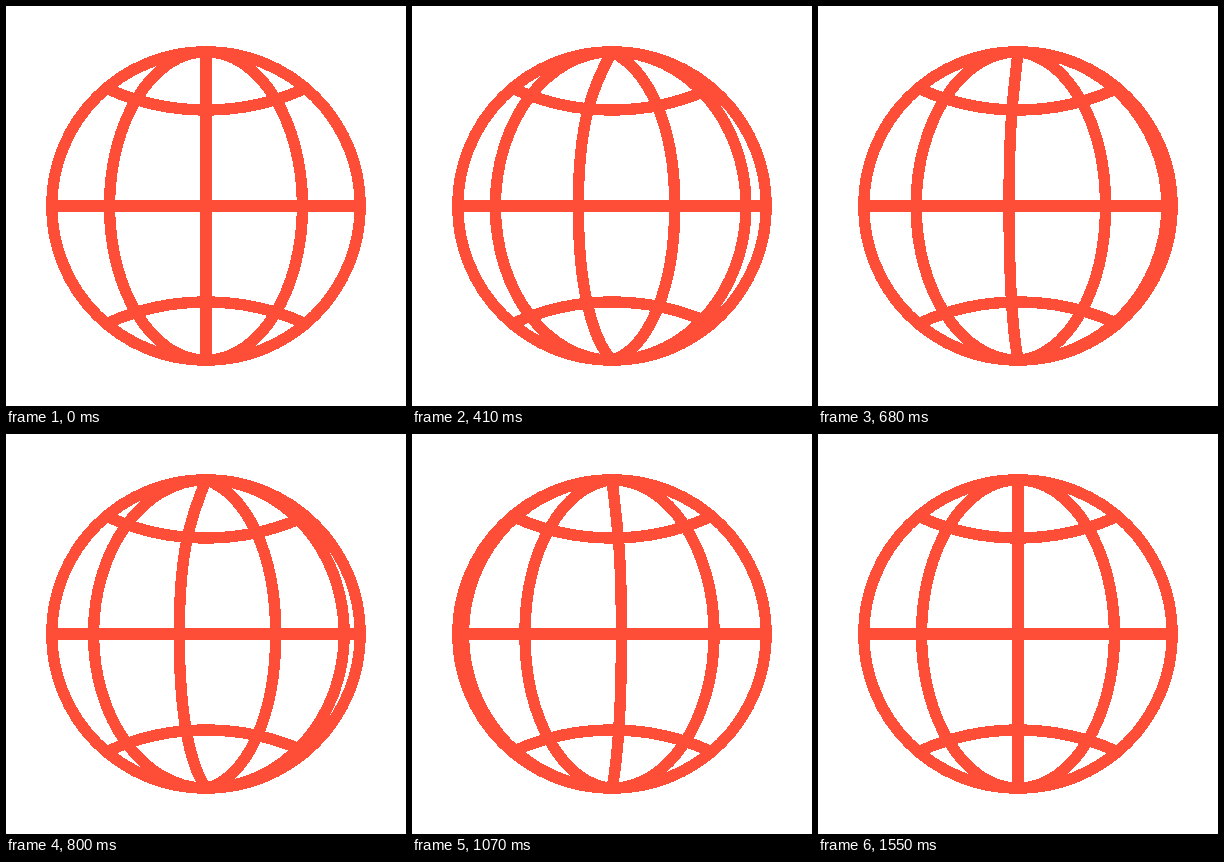
Write an HTML page that moves like this. It is 400 px wide and 400 px high and loops after 1.64 s.

```html
<!DOCTYPE html>
<html lang="en">
<head>
<meta charset="utf-8">
<title>Spinning globe</title>
<style>
  html, body { margin: 0; width: 100%; height: 100%; overflow: hidden; background: #fff; }
  svg { display: block; width: 100%; height: 100%; }
  .globe { fill: none; stroke: #ff4e37; stroke-width: 11.4; shape-rendering: crispEdges; }
</style>
</head>
<body>
<svg viewBox="0 0 400 400">
  <g class="globe">
    <circle cx="200" cy="200" r="154.25"/>
    <path d="M46 200H354"/>
    <path d="M102 83A239 239 0 0 0 298 83"/>
    <path d="M102 317A239 239 0 0 1 298 317"/>
    <path id="meridians"/>
  </g>
</svg>
<script>
  const LOOP = 1640, START = 200, SPIN = 1336, STEP = 30, TURNS = 7;
  const C = 200, R = 154.25, MID = 96.5;
  const KAPPA = 0.5523;                 // handle length of a quarter ellipse
  const DIP_TOP = 51, DIP_BOTTOM = 30;  // pole handles of the straight meridian
  const stops = [-R, -MID, 0, MID, R];
  const meridians = document.getElementById('meridians');

  // cubic-bezier(x1, 0, x2, 1), solved by bisection
  function ease(x, x1 = 0.084, x2 = 0.433) {
    if (x <= 0) return 0;
    if (x >= 1) return 1;
    let lo = 0, hi = 1, t;
    for (let i = 0; i < 30; i++) {
      t = (lo + hi) / 2;
      const u = 1 - t;
      if (3 * u * u * t * x1 + 3 * u * t * t * x2 + t * t * t < x) lo = t;
      else hi = t;
    }
    return t * t * (3 - 2 * t);
  }

  // half ellipse whose poles sharpen as it nears the straight line
  function meridian(x) {
    const flat = Math.max(0, 1 - Math.abs(x) / MID);
    const top = C - R, bottom = C + R, h = KAPPA * R;
    const side = C + x, pole = C + KAPPA * x;
    return `M${C} ${top}` +
      `C${pole} ${top + DIP_TOP * flat} ${side} ${C - h} ${side} ${C}` +
      `C${side} ${C + h} ${pole} ${bottom - DIP_BOTTOM * flat} ${C} ${bottom}`;
  }

  function draw(ms) {
    // the pose advances in 30 ms ticks
    const tick = Math.floor((ms - START + 1) / STEP) * STEP;
    const p = (ease(tick / SPIN) * TURNS) % 1;
    const d = stops.slice(1).map((to, i) => meridian(stops[i] + (to - stops[i]) * p));
    meridians.setAttribute('d', d.join(''));
  }

  const origin = performance.now();
  function loop() {
    draw((performance.now() - origin) % LOOP);
    requestAnimationFrame(loop);
  }
  loop();
</script>
</body>
</html>
```
